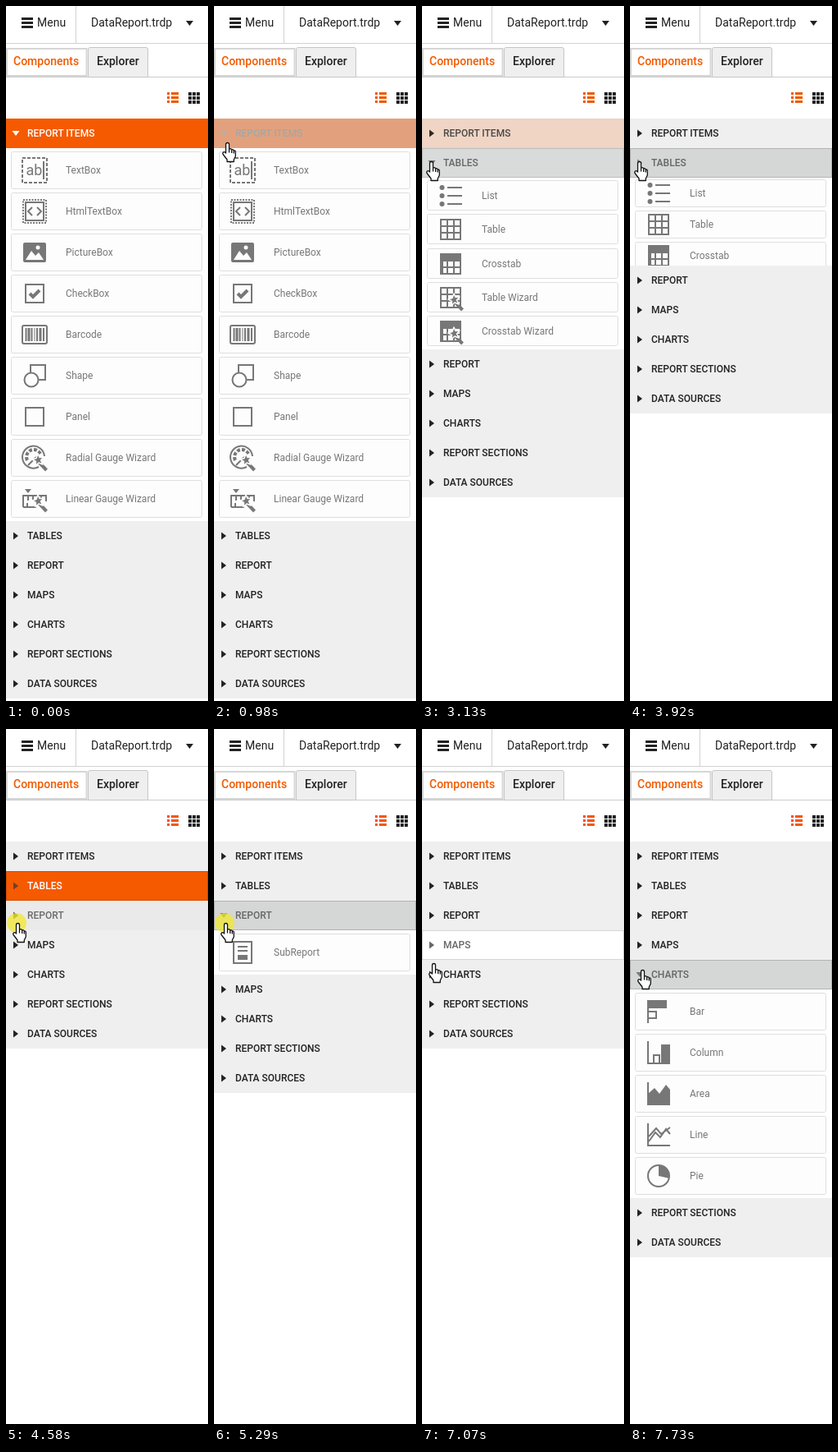
An HTML page that plays this animation: 247 px wide and 846 px high, repeating every 8000 ms.

```html
<!DOCTYPE html>
<html lang="en">
<head>
<meta charset="utf-8">
<title>Report designer components</title>
<style>
  html, body { margin: 0; width: 100%; height: 100%; overflow: hidden; background: #fff; }
  svg { display: block; width: 247px; height: 846px; font-family: Roboto, Arial, sans-serif; }
  .medium { font-weight: 500; }
  .icon { fill: none; stroke: #777; stroke-width: 2; }
  .icon .f { fill: #777; stroke: none; }
  .icon .w { fill: #fdfdfd; stroke: none; }
</style>
</head>
<body>
<svg viewBox="0 0 247 846">
  <g id="chrome">
    <path d="M19 14h14v3H19zM19 19h14v3H19zM19 24h14v3H19zM220 18h9l-4.500 6z" fill="#222"/>
    <path d="M85.500 0V45M0 45.500H247" stroke="#d2d2d2"/>
    <g font-size="14" fill="#222">
      <text x="38" y="25">Menu</text>
      <text x="104" y="25">DataReport.trdp</text>
    </g>
    <path d="M0 86.500H247" stroke="#cbcbcb"/>
    <path d="M1 85V52H98.500V85z" fill="#fff" stroke="#d6d6d6" stroke-width="2"/>
    <path d="M100.500 86.500V53q0-2.500 2.500-2.500H171q2.500 0 2.500 2.500V86.500z" fill="#efefef" stroke="#c6c6c6"/>
    <g font-size="14" class="medium">
      <text x="9" y="72" fill="#f05a00">Components</text>
      <text x="111" y="72" fill="#222">Explorer</text>
    </g>
    <path d="M197 105h3v3h-3zM197 110h3v3h-3zM197 115h3v3h-3zM202 105h9v3h-9zM202 110h9v3h-9zM202 115h9v3h-9z" fill="#f35800"/>
    <path d="M223 107h14M223 112h14M223 117h14" stroke="#222" stroke-width="4" stroke-dasharray="4 1"/>
  </g>
  <g id="panels"></g>
  <g id="pointer"></g>
</svg>
<script>
const LOOP = 8000, TICK = 72.7, ROW = 36, TOP = 137;
const panels = document.getElementById('panels');
const pointer = document.getElementById('pointer');

const wand = '<path d="M5 5L14.500 15" stroke-width="4"/>' +
  '<path class="f" stroke-linejoin="round" style="stroke:#fdfdfd;stroke-width:1.500" d="M4-5l2 4.500 5-.5-3.500 4L10 8 5 6 1 9.500 1.500 4.500-3 2 2 .5z"/>';
const grid = '<path d="M-12-12H12V12H-12zM-4-12V12M4-12V12M-12-4H12M-12 4H12"/>';
const crosstab = grid + '<path class="f" d="M-13-13H13V-5H-13zM-13-13h4V13h-4z"/>';
const axes = '<path d="M-13-14V13H14"/>';

const icons = {
  TextBox: '<rect x="-15" y="-15" width="30" height="30" stroke-dasharray="4 2"/>' +
    '<text class="f" x="-10.500" y="6" font-size="18">ab</text><path d="M11-11V11"/>',
  HtmlTextBox: '<rect x="-14" y="-14" width="28" height="28" stroke-dasharray="2 1.500"/>' +
    '<rect x="-11" y="-11" width="22" height="22"/><path d="M-3-5L-8 0-3 5M3-5L8 0 3 5"/>',
  PictureBox: '<rect class="f" x="-14" y="-12" width="28" height="24" rx="2"/>' +
    '<path class="w" d="M-11 9L-4-2 1 4 5 0 11 9z"/><circle class="w" cx="4" cy="-6" r="2.500"/>',
  CheckBox: '<rect x="-11" y="-11" width="22" height="22"/><path d="M-6 0L-2 4 6-4" stroke-width="4"/>',
  Barcode: '<rect x="-15" y="-11" width="30" height="22" rx="2"/>' +
    '<path d="M-10.500-8V8M-3.500-8V8M3-8V8M11-8V8"/><path d="M-7-8V8M7-8V8" stroke-width="3"/><path d="M0-8V8" stroke-width="1"/>',
  Shape: '<rect x="-5" y="-13" width="18" height="18"/><circle cx="-4" cy="5" r="8.500" fill="#fdfdfd"/>',
  Panel: '<rect x="-11" y="-11" width="22" height="22"/>',
  'Radial Gauge Wizard': '<path d="M5 11A13.500 13.500 0 1 1 12-2"/>' +
    '<path d="M-9 3A8 8 0 0 1 7-5" stroke-width="4" stroke-dasharray="4 2"/><path d="M-8 9L2-1"/>' + wand,
  'Linear Gauge Wizard': '<path class="f" d="M-12-12h8l-4 5z"/>' +
    '<path d="M-14 10V-4H14V3M-14 10H2M-8-3V2M-2-3V1M8-3V1M-9 10V5"/>' + wand,
  List: [-10, 0, 10].map(y => `<circle class="f" cx="-10.500" cy="${y}" r="3"/><path d="M-4 ${y}H14"/>`).join(''),
  Table: grid,
  Crosstab: crosstab,
  'Table Wizard': grid + wand,
  'Crosstab Wizard': crosstab + wand,
  SubReport: '<path d="M-11-13H11V13H-11zM-6-7H6M-6-2H6"/><rect class="f" x="-6" y="3" width="12" height="6"/>',
  'Map Wizard': '<path d="M-13-10l8-3 9 3 8-3V2M-13-10V11l8-3 6 2M-5-13V8M4-10V0"/>' + wand,
  'Choropleth Wizard': '<path d="M-13-10l8-3 9 3 8-3V2M-13-10V11l8-3 6 2"/><path class="f" d="M-5-13l9 3V0l-9 4z"/>' + wand,
  Bar: '<path d="M-13-14V14M-13 0H-3V8H-13"/><rect class="f" x="-13" y="-14" width="23" height="10"/>',
  Column: axes + '<path d="M-6 13V3H1V13"/><rect class="f" x="3" y="-10" width="11" height="23"/>',
  Area: axes + '<path class="f" d="M-13 0L-5-7 1 0 9-11 14-5V13H-13z"/>',
  Line: axes + '<path d="M-12 8L-4-3 2 3 9-7 14-1M-12 2L-3-8 3-1 14-9"/>',
  Pie: '<circle r="13"/><path class="f" d="M0 0V-13A13 13 0 0 1 13 3z"/>'
};

// Header looks: background, border, text and arrow colours.
const looks = {
  base: ['#efefef', '#efefef', '#222222', '#222222'],
  hover: ['#eaeaea', '#eaeaea', '#6a6a6a', '#5a5a5a'],
  over: ['#d5d5d5', '#d5d5d5', '#666666', '#777777'],
  active: ['#d5d6d6', '#b3b5b4', '#666666', '#777777'],
  blank: ['#ffffff', '#d6d6d6', '#666666', '#666666'],
  selected: ['#f55a00', '#d34c00', '#ffffff', '#704028'],
  initial: ['#f55a00', '#f55a00', '#ffffff', '#ffffff']
};

function section(name, items = [], { enter, open, close, leave, drop } = {}) {
  const keys = [[-LOOP, 'base'], [enter, 'hover'], [open, 'active'],
    [leave, 'blank'], [leave + TICK, 'selected'], [drop, 'base']].filter(k => k[0] === k[0] && k[0] !== undefined);
  return { name, items, open, close, keys };
}

const sections = [
  section('REPORT ITEMS', ['TextBox', 'HtmlTextBox', 'PictureBox', 'CheckBox', 'Barcode', 'Shape', 'Panel',
    'Radial Gauge Wizard', 'Linear Gauge Wizard'], { open: -LOOP, close: 2260, leave: 2555, drop: 3050 }),
  section('TABLES', ['List', 'Table', 'Crosstab', 'Table Wizard', 'Crosstab Wizard'],
    { enter: 2628, open: 3050, close: 3920, leave: 4215, drop: 4730 }),
  section('REPORT', ['SubReport'], { enter: 4288, open: 4730, close: 5440, leave: 5658, drop: 6080 }),
  section('MAPS', ['Map Wizard', 'Choropleth Wizard'],
    { enter: 5730, open: 6080, close: 6730, leave: 7069, drop: 7510 }),
  section('CHARTS', ['Bar', 'Column', 'Area', 'Line', 'Pie'], { enter: 7142, open: 7510 }),
  section('REPORT SECTIONS'),
  section('DATA SOURCES')
];
sections[0].keys.splice(0, 2, [-LOOP, 'initial'], [980, 'over'], [2260, 'active']);

// Pointer moves: start, steps, end position.
const moves = [[250, 12, 10, 158], [2410, 5, 10, 189], [4070, 5, 13, 236], [5585, 4, 11, 263], [6997, 3, 14, 293]];
const clicks = [[2120, 2260], [2850, 3050], [3770, 3920], [4580, 4730],
  [5290, 5440], [5930, 6080], [6580, 6730], [7370, 7510]];

const stepsSince = (t, start) => t < start ? 0 : Math.floor((t - start) / TICK) + 1;

function settle(t, start) {
  const n = stepsSince(t, start);
  return n > 3 ? 1 : 1 - 0.42 ** n;
}

function mix(a, b, p) {
  const channel = (c, i) => parseInt(c.substr(1 + 2 * i, 2), 16);
  return `rgb(${[0, 1, 2].map(i => Math.round(channel(a, i) + (channel(b, i) - channel(a, i)) * p))})`;
}

function lookAt(keys, t) {
  let i = keys.length - 1;
  while (i > 0 && keys[i][0] > t) i--;
  const [start, name] = keys[i];
  const from = looks[keys[Math.max(0, i - 1)][1]];
  const p = name === 'blank' ? 1 : settle(t, start);
  return looks[name].map((colour, c) => mix(from[c], colour, p));
}

function openness(s, t) {
  if (s.open === undefined || t < s.open) return 0;
  return t >= s.close ? 1 - settle(t, s.close) : settle(t, s.open);
}

function header(s, y, t) {
  const [fill, border, text, arrow] = lookAt(s.keys, t);
  const expanded = t >= s.open && !(t >= s.close);
  const tip = expanded ? `M7.500 ${y + 15}h9l-4.500 6z` : `M9 ${y + 13.5}l6 4.500-6 4.500z`;
  return `<rect y="${y}" width="247" height="${ROW}" fill="${fill}"/>` +
    `<rect x=".5" y="${y + 0.5}" width="246" height="${ROW - 1}" fill="none" stroke="${border}"/>` +
    `<path d="${tip}" fill="${arrow}"/>` +
    `<text x="26" y="${y + 22}" class="medium" font-size="12" fill="${text}">${s.name}</text>`;
}

function list(items, y, height, p) {
  const pitch = Math.max(38, 50 * p);
  const rows = items.map((name, i) => {
    const top = Math.round(4 * p + i * pitch), h = Math.round(pitch - 4), mid = top + Math.round(h / 2);
    return `<rect x="6.500" y="${top + 0.5}" width="233" height="${h - 1}" rx="2" fill="#fdfdfd" stroke="#dedede"/>` +
      `<g class="icon" transform="translate(35 ${mid})">${icons[name]}</g>` +
      `<text x="73" y="${mid + 4}" font-size="12" fill="#777">${name}</text>`;
  });
  return `<svg y="${y}" width="247" height="${height}" style="width:247px;height:${height}px;overflow:hidden">${rows.join('')}</svg>`;
}

function drawPanels(t) {
  let y = TOP, out = '';
  for (const s of sections) {
    out += header(s, y, t);
    y += ROW;
    const p = openness(s, t), height = Math.round((4 + 50 * s.items.length) * p);
    if (p > 0) {
      out += list(s.items, y, height, p);
      y += height;
    }
  }
  return out;
}

function drawPointer(t) {
  if (t < moves[0][0]) return '';
  let x = 262, y = 557;
  for (const [start, steps, toX, toY] of moves) {
    const k = Math.min(1, stepsSince(t, start) / steps), p = k * k * (3 - 2 * k);
    x += (toX - x) * p;
    y += (toY - y) * p;
  }
  const pressed = clicks.some(([on, off]) => t >= on && t < off);
  return `<g transform="translate(${Math.round(x)} ${Math.round(y)})">` +
    (pressed ? '<circle r="12" fill="#f3e928" fill-opacity=".72"/>' : '') +
    '<path transform="translate(1.500 0)" fill="#fff" stroke="#111" stroke-width="1.300" stroke-linejoin="round" ' +
    'd="M-2 2.500a2 2 0 0 1 4 0V8.500l.6-.5a1.700 1.700 0 0 1 2.600 1 1.700 1.700 0 0 1 2.600 1 1.600 1.600 0 0 1 2 1.700V17l-2 4v2.500H-.5V21L-5.500 14.500a1.800 1.800 0 0 1 2.500-2.500l1 1z' +
    'M2 8.500v4M5.200 9.500v3.500M7.800 10.500v3"/></g>';
}

function update(node, markup) {
  if (node.markup !== markup) node.innerHTML = node.markup = markup;
}

function frame() {
  const t = performance.now() % LOOP;
  update(panels, drawPanels(t));
  update(pointer, drawPointer(t));
  requestAnimationFrame(frame);
}
frame();
</script>
</body>
</html>
```
